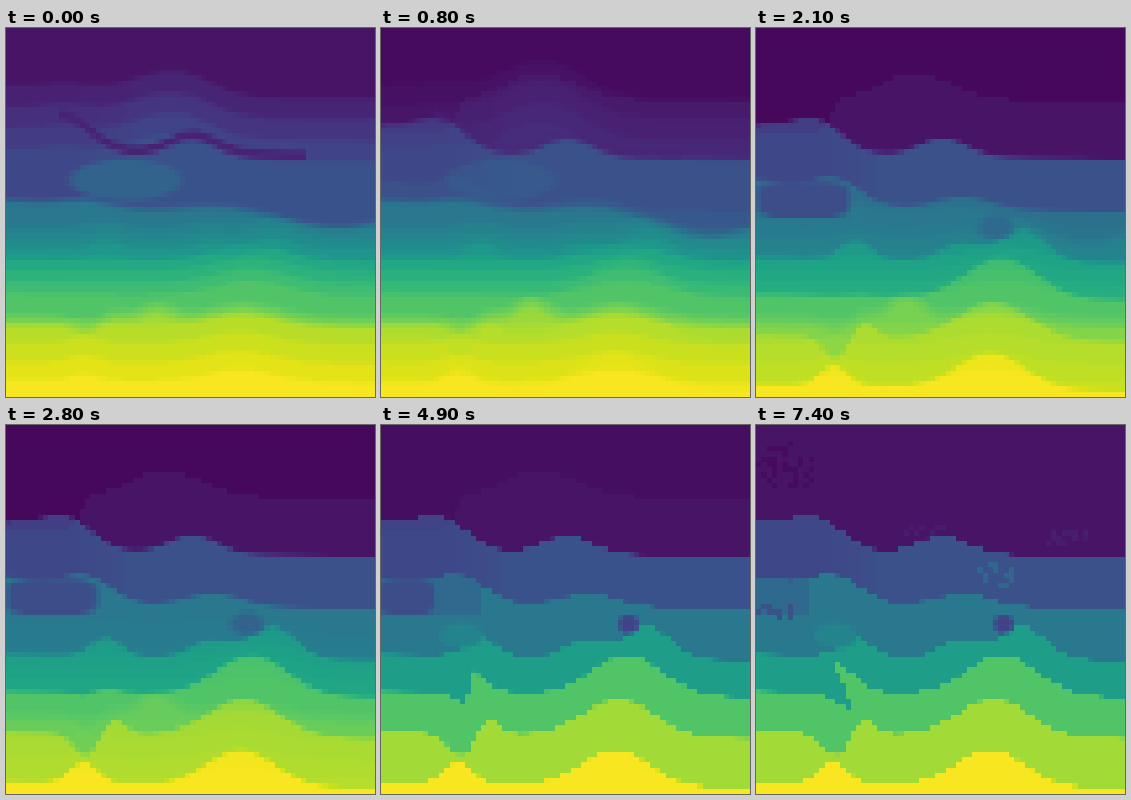
A matplotlib script that plays this animation: 369x369 px, repeating every 7500 ms.

```python
import numpy as np
import matplotlib.pyplot as plt
from matplotlib.animation import FuncAnimation

SIZE, CELLS, FRAMES, STEP = 369, 70, 75, 100

axis = (np.arange(CELLS) + 0.5) * SIZE / CELLS
X, Y = np.meshgrid(axis, axis)
SPECKLE = np.random.default_rng(4).random((CELLS, CELLS))
SPLIT = 4  # partial steps that make up a blurred interface
LEFT = 0.035 * np.clip((130 - X) / 60, 0, 1)
FAULT = 76 + 0.45 * (Y - 235)


def bump(x, width, height):
    return height * np.exp(-((X - x) / width) ** 2)


def ramp(t, t0, t1):
    k = np.clip((t - t0) / (t1 - t0), 0, 1)
    return k * k * (3 - 2 * k)


class Layer:
    """An interface: folds of its true shape, and the blurred first guess."""

    def __init__(self, jump, depth, folds, blur, done, swell=(0, 1, 0)):
        self.jump, self.done = jump, done
        self.curve = depth + 0.018 * X - sum(bump(*f) for f in folds)
        self.flat = 0.35 * (self.curve - self.curve.mean())
        self.blur = np.linspace(*blur, SPLIT)
        self.swell = bump(*swell)

    def step(self, t, curve, soft):
        def below(c):
            return np.clip((Y - c) / soft + 0.5, 0, 1)

        s = ramp(t, 0, self.done)
        guess = self.flat - self.swell * min(1, 0.5 + t / 3)
        early = sum(below(d + guess) for d in self.blur) / SPLIT
        return self.jump * (s * below(curve) + (1 - s) * early)


LAYERS = [
    Layer(0.197 - LEFT, 125, [(0, 28, 22), (55, 40, 36), (187, 34, 18)],
          (65, 128), 1.4, swell=(155, 55, 44)),
    Layer(0.15 + LEFT, 178, [(0, 48, 26), (78, 38, 28), (208, 40, 13)],
          (176, 182), 3.0, swell=(330, 60, -32)),
    Layer(0.16, 229, [(100, 21, 18), (205, 28, 17), (267, 32, 32)],
          (196, 228), 3.8),
    Layer(0.17, 266, [(246, 50, 40)], (228, 263), 4.0),
    Layer(0.13, 307, [(80, 17, -22), (108, 16, 14), (238, 50, 37)],
          (284, 297), 4.4, swell=(150, 24, 24)),
    Layer(0.13, 357, [(78, 20, 21), (235, 48, 36)], (294, 350), 4.0),
]
HILL = 72 + 32 * np.clip((85 - X) / 20, 0, 1) - bump(160, 50, 26)

# speckled spots: value, centre, radii, time of arrival
SPOTS = [
    (0.33, 240, 150, 22, 13, 6.2),
    (0.25, 22, 188, 22, 8, 6.2),
    (0.08, 312, 114, 24, 10, 5.2),
    (0.08, 172, 106, 24, 5, 6.2),
    (0.03, 32, 42, 30, 24, 5.0),
]


def blend(v, value, weight):
    return v + (value - v) * weight


def blob(cx, cy, rx, ry, soft=0.3, power=2):
    r = (np.abs((X - cx) / rx) ** power + np.abs((Y - cy) / ry) ** power) ** (1 / power)
    return np.clip((1 - r) / soft, 0, 1)


def interfaces(t):
    curves = [layer.curve for layer in LAYERS]
    right = np.clip((X - FAULT) / (3 + 27 * (1 - ramp(t, 3.5, 7.4))) + 0.5, 0, 1)
    throw = right * bump(70, 34, 34) - (1 - right) * bump(100, 25, 18)
    curves[3] = curves[3] - throw * ramp(t, 1.5, 4.5)
    return curves


def field(t):
    soft = 6 - 5.5 * ramp(t, 0, 6)
    curves = interfaces(t)

    dark = np.interp(t, [0, 0.4, 1.2, 3, 4.9, 6], [0, 0.6, 1, 1, 0.5, 0])
    v = 0.053 - 0.03 * dark * (Y < HILL)
    v = v + sum(a.step(t, c, soft) for a, c in zip(LAYERS, curves))

    # faint reflector and fast lens of the first guess
    fade = 1 - ramp(t, 0, 1.4)
    reflector = np.clip(1.4 - np.abs(Y - curves[0] + 3) / 5, 0, 1)
    v = blend(v, 0.10, fade * reflector * (X > 55) * (X < 300))
    v = blend(v, 0.32, fade * blob(120, 152, 62, 22, 0.2))

    # left block fills in while its slow core shrinks
    edge = np.interp(t, [5.9, 7.4], [98, 55])
    block = (X < edge) & (Y > curves[1]) & (Y < 192)
    v = blend(v, 0.34, ramp(t, 2.5, 4.5) * block)
    core = np.interp(t, [1.5, 2.8, 4.9, 5.9, 7.4], [52, 50, 30, 16, 1])
    core = blob(core - 4, 172, core, 20, 0.2, power=4)
    v = blend(v, 0.235, ramp(t, 0.8, 1.5) * core)
    v = blend(v, 0.45, ramp(t, 3, 4.9) * blob(80, 211, 25, 15))

    # slow pocket focuses
    k = ramp(t, 2.2, 4.6)
    pocket = blob(240 + 8 * k, 199, 23 - 10 * k, 15 - 3 * k, 0.45)
    v = blend(v, 0.34 - 0.14 * k, ramp(t, 0.8, 2.2) * pocket)

    for value, cx, cy, rx, ry, start in SPOTS:
        grains = (blob(cx, cy, rx, ry, 0.01) > 0) & (SPECKLE < 0.4)
        v = blend(v, value, ramp(t, start, start + 1.2) * grains)
    return v


fig = plt.figure(figsize=(SIZE / 72, SIZE / 72), dpi=72)
ax = fig.add_axes([0, 0, 1, 1])
ax.axis("off")
image = ax.imshow(field(0), cmap="viridis", vmin=0, vmax=1,
                  interpolation="nearest", aspect="auto")


def update(n):
    image.set_data(field(n * STEP / 1000))
    return (image,)


anim = FuncAnimation(fig, update, frames=FRAMES, interval=STEP,
                     repeat=True, repeat_delay=0, blit=False)
plt.show()
```
